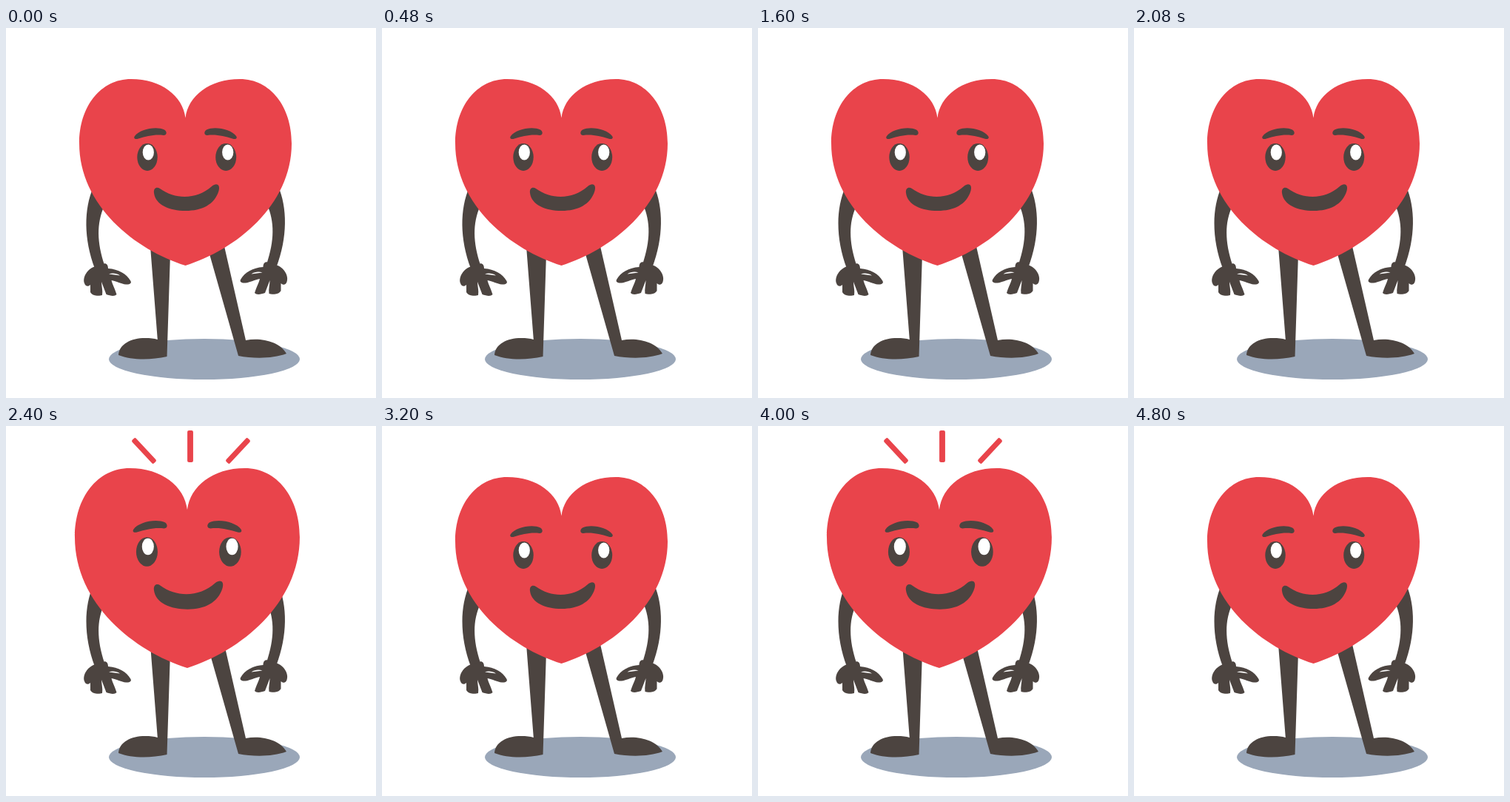
Recreate the animation shown at these times as an HTML page. Size 500 by 500 pixels, loop 5.6 s.

```html
<!DOCTYPE html>
<html lang="en">
<head>
<meta charset="utf-8">
<title>Beating heart</title>
<style>
  html, body { margin: 0; width: 100%; height: 100%; overflow: hidden; background: #fff; }
  svg { display: block; width: 100vw; height: 100vh; }
  .ink { fill: #4c4440; }
  .red { fill: #e9444b; }
  .white { fill: #fff; }
</style>
</head>
<body>
<svg viewBox="0 0 500 500">
  <defs>
    <g id="arm">
      <path class="ink" d="M118 215C105 245 105 285 120 325L136 328L133 320C123 290 122 264 133 240Z"/>
      <path class="ink" d="M121 322C110 325 103 337 106 345C107 349 111 350 114 347L114 357C117 363 127 362 130 361C131 355 129 349 129 343L135.500 360C141 362 147 363 149.500 360C147 352 144 347 142.500 341C149 342 156 346 162 346.500C167 347 170 345 168.500 342C163 332 152 326 138 325C138 320 135 317 131 319Z"/>
      <path class="white" d="M139 332.500C143 331 149 331 154 334.500C149 333.500 144 333.500 139 332.500Z"/>
    </g>
    <path id="brow" class="ink" d="M174 146C180 137 203 132 214 137.500C218 140 217.500 145 213 145C200 143.500 190 146.500 179 149.500C174 151 172 149 174 146Z"/>
    <rect id="ray" class="red" x="-3.500" y="-21.500" width="7" height="43" rx="2"/>
  </defs>

  <ellipse cx="268" cy="447.500" rx="129" ry="27.500" fill="#9aa7b9"/>
  <path class="ink" d="M195 295L204.800 421C200 419.500 195 419 188 419C169 419 153 427 152 442C170 449 195 449 217.500 444L222.300 295Z"/>
  <path class="ink" d="M272 295L314 443C335 447 360 447 379 440C370 424 345 418 324 422L295 295Z"/>
  <use href="#arm"/>
  <use href="#arm" transform="translate(485.500 -2) scale(-1 1)"/>

  <g id="body">
    <path class="red" d="M242.500 121.500C239 92 210 69 169 69C128 69 99 106 99 156C99 240 175 300 242.500 321C310 300 386 240 386 156C386 106 357 69 316 69C275 69 246 92 242.500 121.500Z"/>
    <use href="#brow"/>
    <use href="#brow" transform="translate(485 0) scale(-1 1)"/>
    <ellipse class="ink" cx="191" cy="174.500" rx="13.700" ry="18.500"/>
    <ellipse class="white" cx="192.300" cy="168" rx="7.600" ry="10.500"/>
    <ellipse class="ink" cx="297.200" cy="174.500" rx="14" ry="18.500"/>
    <ellipse class="white" cx="299.700" cy="168" rx="7.600" ry="10.500"/>
    <path class="ink" d="M200 223C199 216 204 214 208 217C230 233 259 231 278 214C284 209 290 211 287.500 220C282 239 264 247 243 247C221 247 202 239 200 223Z"/>
  </g>

  <g id="rays">
    <use href="#ray" transform="translate(186.500 33.500) rotate(-43)"/>
    <use href="#ray" transform="translate(249 27.500) scale(1.120 1)"/>
    <use href="#ray" transform="translate(313.500 33.500) rotate(43)"/>
  </g>
</svg>
<script>
  const STEP = 800, LOOP = 5600;
  const body = document.getElementById('body');
  const rays = document.getElementById('rays');
  const SWELL = 'translate(93 57) scale(1.059 1.071) translate(-99 -69)';

  function draw(ms) {
    const beat = Math.floor(ms % LOOP / STEP) % 2 === 1;
    body.setAttribute('transform', beat ? SWELL : 'translate(0 0)');
    rays.setAttribute('visibility', beat ? 'visible' : 'hidden');
  }

  const start = performance.now();
  function tick() {
    draw(performance.now() - start);
    requestAnimationFrame(tick);
  }
  tick();
</script>
</body>
</html>
```
